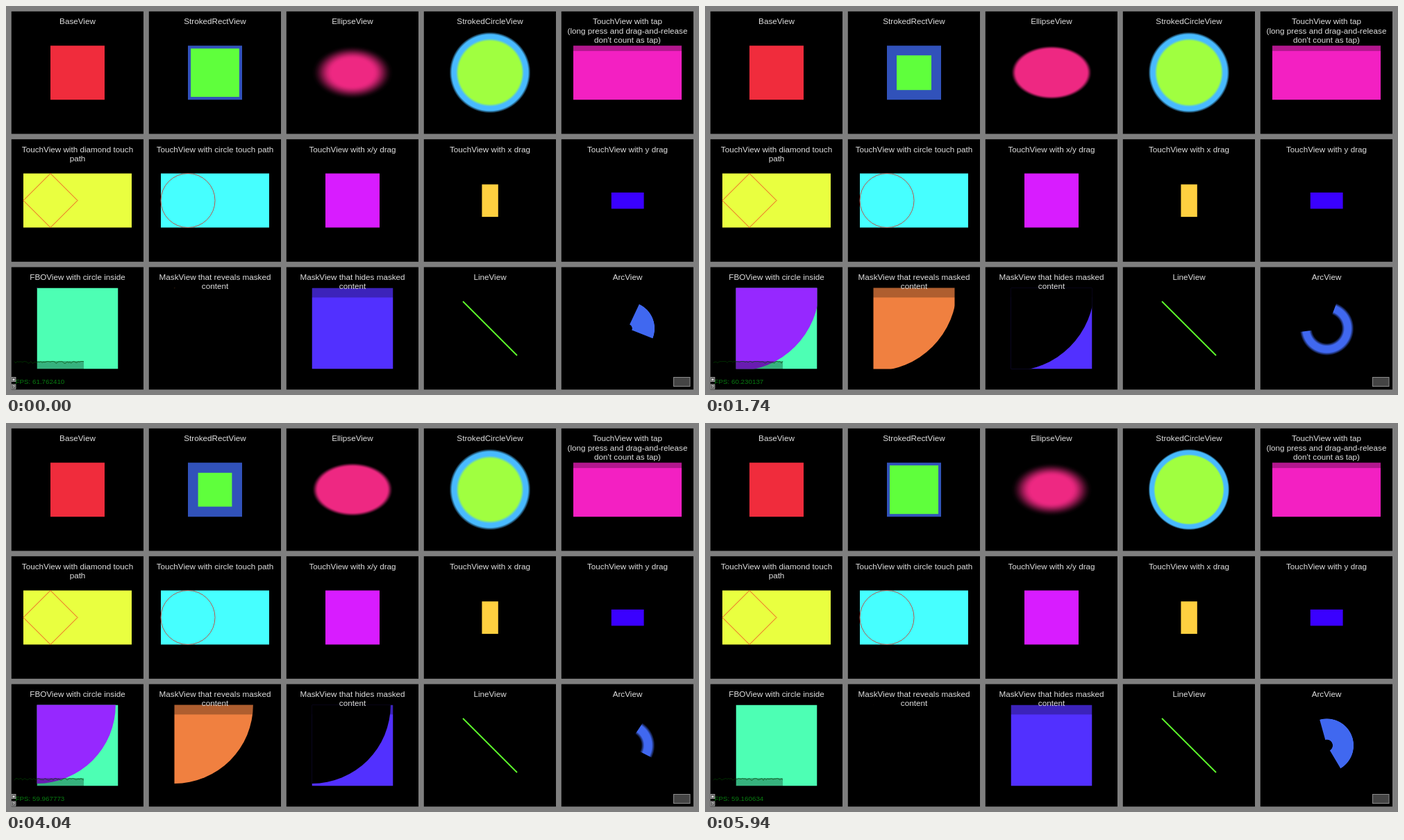
Animation, 998 px wide and 561 px high, one loop 5.97 s. Source, as an HTML page with a canvas:

```html
<!DOCTYPE html>
<html lang="en">
<head>
<meta charset="utf-8">
<title>View gallery</title>
<style>
html, body { margin: 0; width: 100%; height: 100%; overflow: hidden; background: #7f7f7f; }
canvas { display: block; }
</style>
</head>
<body>
<canvas id="stage" width="998" height="561"></canvas>
<script>
const ctx = document.getElementById('stage').getContext('2d');
const LOOP = 5970, LEAD = 149, DEG = Math.PI / 180;
const COL = 198, ROW = 184.4, GAP = 7.8, LINE = 13.3;
const FONT = '"Liberation Sans", Arial, sans-serif';

const labels = [
  ['BaseView'], ['StrokedRectView'], ['EllipseView'], ['StrokedCircleView'],
  ['TouchView with tap', '(long press and drag-and-release', "don't count as tap)"],
  ['TouchView with diamond touch', 'path'], ['TouchView with circle touch path'],
  ['TouchView with x/y drag'], ['TouchView with x drag'], ['TouchView with y drag'],
  ['FBOView with circle inside'], ['MaskView that reveals masked', 'content'],
  ['MaskView that hides masked', 'content'], ['LineView'], ['ArcView']
];
const rates = ['61.762410', '62.268044', '60.230137', '59.603527', '59.967773', '58.633694', '59.160634'];

// Ping-pong between 0 and 1 with quadratic ease-in-out; 0 at time `low`.
function swing(time, low, half) {
  let u = Math.abs((time - low) / half) % 2;
  if (u > 1) u = 2 - u;
  return u < 0.5 ? 2 * u * u : 1 - 2 * (1 - u) * (1 - u);
}

function rect(x, y, w, h, color) {
  ctx.fillStyle = color;
  ctx.fillRect(x, y, w, h);
}

function disc(x, y, r, fill) {
  ctx.fillStyle = fill;
  ctx.beginPath();
  ctx.arc(x, y, r, 0, 2 * Math.PI);
  ctx.fill();
}

function radial(x, y, r, stops) {
  const g = ctx.createRadialGradient(x, y, 0, x, y, r);
  for (const [at, color] of stops) g.addColorStop(Math.min(1, Math.max(0, at / r)), color);
  return g;
}

function panels() {
  rect(0, 0, 998, 561, '#7f7f7f');
  for (let i = 0; i < 15; i++)
    rect(GAP + (i % 5) * COL, GAP + Math.floor(i / 5) * ROW, 190.2, 176.6, '#000');
}

function ellipse(time) {
  const soft = Math.max(0.015, 0.5 * (1 - swing(time, 0, 3000)));
  const stops = [];
  for (let k = 0; k <= 8; k++) {
    const u = k / 8, alpha = 1 - u * u * (3 - 2 * u);
    stops.push([1 - soft + soft * u, `rgba(238,40,130,${alpha})`]);
  }
  ctx.save();
  ctx.translate(499, 96);
  ctx.scale(58.5, 39);
  disc(0, 0, 1, radial(0, 0, 1, stops));
  ctx.restore();
}

function strokedCircle(time) {
  const e = swing(time, 3000, 2000), R = 58.5;
  const w = 3.9 + 11.7 * e, s = Math.max(0.8, 5.85 * e);
  disc(697, 96, R, radial(697, 96, R, [
    [R - w - s / 2, '#a0ff40'], [R - w + s / 2, '#48baff'],
    [R - s, '#48baff'], [R, 'rgba(72,186,255,0)']
  ]));
}

function arcView(time) {
  const x = 895.5, y = 465, R = 39;
  const blur = swing(time, 0, 3000 / 2);
  const w = 3.7 + 30.3 * swing(time, 3000, 2500);
  const from = -180 * (1 - swing(time, 3000, 2000)) + 2.5 * blur;
  const to = 180 * swing(time, 4975, 2750) - 2.5 * blur;
  if (to <= from) return;
  const s = Math.min(w / 2, Math.max(0.8, 5 * blur)), inner = R - w;
  const solid = '#4068f0', clear = 'rgba(64,104,240,0)';
  ctx.fillStyle = radial(x, y, R, [
    [inner - s / 2, clear], [inner + s / 2, solid], [R - s, solid], [R, clear]
  ]);
  ctx.beginPath();
  ctx.arc(x, y, R, from * DEG, to * DEG);
  ctx.arc(x, y, Math.max(0, inner - s / 2), to * DEG, from * DEG, true);
  ctx.fill();
}

function quarter(x, base, color, r) {
  const y = 406.5;
  ctx.save();
  ctx.beginPath();
  ctx.rect(x, y, 117, 117);
  ctx.clip();
  if (base) rect(x, y, 117, 117, base);
  disc(x, y, r, color);
  ctx.restore();
}

function touchPaths() {
  ctx.lineWidth = 1;
  ctx.strokeStyle = '#f04a24';
  ctx.beginPath();
  ctx.moveTo(25, 280.5);
  ctx.lineTo(64, 241.5);
  ctx.lineTo(103, 280.5);
  ctx.lineTo(64, 319.5);
  ctx.closePath();
  ctx.stroke();
  ctx.strokeStyle = '#b45a50';
  ctx.beginPath();
  ctx.arc(262, 280.5, 39, 0, 2 * Math.PI);
  ctx.stroke();
}

function captions() {
  ctx.font = '11.7px ' + FONT;
  ctx.textAlign = 'center';
  labels.forEach((lines, i) => {
    const x = 103 + (i % 5) * COL, y = 26.2 + Math.floor(i / 5) * ROW;
    if (lines.length > 1)
      rect(x - 93, y - 11, 186, 11 + lines.length * LINE - 1.2, 'rgba(0,0,0,0.27)');
    ctx.fillStyle = '#dedede';
    lines.forEach((line, k) => ctx.fillText(line, x, y + k * LINE));
  });
}

function monitor(t) {
  rect(12, 512, 100, 38, 'rgba(0,0,0,0.3)');
  ctx.strokeStyle = 'rgba(0,70,0,0.8)';
  ctx.lineWidth = 0.8;
  ctx.beginPath();
  const shift = Math.floor(t / 33);
  for (let k = 0; k <= 50; k++) {
    const n = Math.sin((k + shift) * 12.9898) * 43758.5453;
    ctx.lineTo(12 + k * 2, 512.5 + 3 * (n - Math.floor(n)) ** 2);
  }
  ctx.stroke();

  ctx.font = '9.8px ' + FONT;
  ctx.textAlign = 'left';
  ctx.fillStyle = '#087a10';
  ctx.fillText('FPS: ' + rates[Math.floor((t + 500) / 1000)], 13.5, 545.2);

  for (const y of [535, 545.5]) {
    rect(7.8, y, 6.5, 7, '#555');
    ctx.strokeStyle = '#aaa';
    ctx.strokeRect(8.2, y + 0.4, 5.7, 6.2);
  }
  disc(11, 538.7, 1.5, '#ddd');
  ctx.font = 'bold 6px ' + FONT;
  ctx.fillStyle = '#eee';
  ctx.fillText('?', 9.3, 551.2);

  rect(961, 535, 24, 13.5, '#444');
  ctx.lineWidth = 1;
  ctx.strokeStyle = '#8c8c8c';
  ctx.strokeRect(961.5, 535.5, 23.5, 13);
}

function draw(t) {
  const time = t + LEAD;
  panels();

  rect(64, 57.2, 78, 78, '#f02c3c');
  const edge = 3.9 + 11.7 * swing(time, 0, 1500);
  rect(262, 57.2, 78, 78, '#3152ba');
  rect(262 + edge, 57.2 + edge, 78 - 2 * edge, 78 - 2 * edge, '#5fff3c');
  ellipse(time);
  strokedCircle(time);
  rect(817, 57.2, 156, 78, '#f320c2');

  rect(25, 241.5, 156, 78, '#e9ff40');
  rect(223, 241.5, 156, 78, '#46ffff');
  touchPaths();
  rect(460, 241.5, 78, 78, '#d81cff');
  rect(685.4, 257.3, 23.4, 46.8, '#ffd040');
  rect(871.8, 269, 46.8, 23.4, '#3a00ff');

  const r = 117 * Math.SQRT2 * swing(time, 0, 3000);
  quarter(44.5, '#4dffb4', '#9628ff', r);
  quarter(242.5, null, '#f08040', r);
  quarter(440.5, '#5230ff', '#000', r);

  ctx.strokeStyle = '#5fff2c';
  ctx.lineWidth = 1.8;
  ctx.beginPath();
  ctx.moveTo(658, 426);
  ctx.lineTo(736, 504);
  ctx.stroke();
  arcView(time);

  captions();
  monitor(t);
}

const begun = performance.now();
function tick() {
  draw((performance.now() - begun) % LOOP);
  requestAnimationFrame(tick);
}
tick();
</script>
</body>
</html>
```
